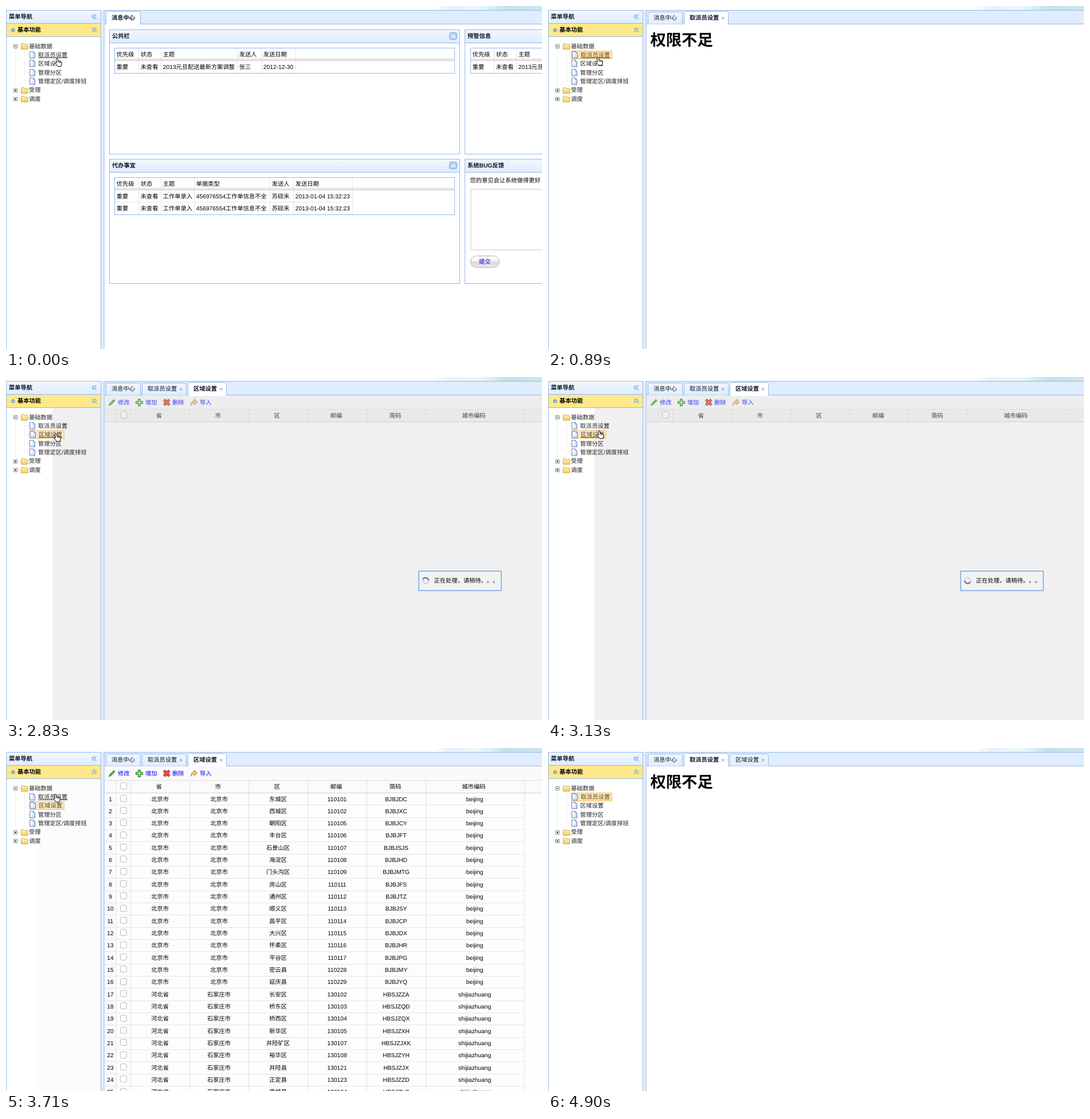
Recreate the animation shown at these times as an HTML page. Size 935 by 599 pixels, loop 5.3 s.

```html
<!DOCTYPE html>
<html lang="zh-CN">
<head>
<meta charset="utf-8">
<style>
html, body { margin: 0; width: 100%; height: 100%; overflow: hidden; background: #fff; }
svg { display: block; font: 10.25px "Liberation Sans", "Noto Sans CJK SC", "Noto Sans CJK", sans-serif; text-rendering: geometricPrecision; text-spacing-trim: space-all; }
</style>
</head>
<body>
<svg width="935" height="599" viewBox="0 0 935 599">
  <defs>
    <linearGradient id="bar" x2="0" y2="1"><stop stop-color="#f1f6ff"/><stop offset="1" stop-color="#e0ecff"/></linearGradient>
    <linearGradient id="head" x2="0" y2="1"><stop offset=".7" stop-color="#fff"/><stop offset="1" stop-color="#d6d6d6"/></linearGradient>
    <linearGradient id="pill" x2="0" y2="1"><stop stop-color="#fff"/><stop offset=".48" stop-color="#f1f1f1"/><stop offset=".52" stop-color="#d8d8d8"/><stop offset="1" stop-color="#ececec"/></linearGradient>
    <linearGradient id="folder" x2="0" y2="1"><stop stop-color="#fff3bd"/><stop offset="1" stop-color="#f5cf55"/></linearGradient>
    <linearGradient id="page" x2="1" y2="1"><stop offset=".3" stop-color="#fff"/><stop offset="1" stop-color="#b5cff2"/></linearGradient>
    <linearGradient id="banner"><stop stop-color="#fff"/><stop offset=".15" stop-color="#e8f1fb"/><stop offset=".4" stop-color="#eef7fb"/><stop offset=".55" stop-color="#d5eff3"/><stop offset=".68" stop-color="#c5dfe8"/><stop offset="1" stop-color="#cde7ee"/></linearGradient>
  </defs>
  <g id="scene"></g>
</svg>
<script>
const LOOP = 5300, BLUE = '#95b8e7', INK = '#0b1526';

// start, view, selected tree row, underlined tree row, cursor, x, y
const steps = [
  [0, 'desk', 0, 1, 'hand', 85, 91],
  [150, 'desk', 0, 1, 'hand', 83, 89],
  [890, 'denied', 1, 1, 'hand', 83, 89],
  [1490, 'denied', 1, 1, 'hand', 84, 93],
  [1640, 'denied', 1, 2, 'hand', 82, 101],
  [1930, 'blank', 2, 2, 'hand', 82, 101],
  [2830, 'loading', 2, 2, 'hand', 83, 98],
  [2980, 'loading', 2, 2, 'hand', 84, 95],
  [3130, 'loading', 2, 2, 'hand', 85, 93],
  [3280, 'grid', 2, 1, 'hand', 85, 87],
  [3420, 'grid', 2, 1, 'hand', 88, 78],
  [3570, 'grid', 2, 0, 'arrow', 86, 77],
  [3710, 'grid', 2, 1, 'hand', 82, 80],
  [4010, 'blank', 1, 1, 'hand', 82, 80],
  [4160, 'denied', 1, 1, 'hand', 82, 80],
  [4310, 'denied', 1, 0, 'arrow', 126, 104],
  [4450, 'denied', 1, 0, 'arrow', 340, 234],
  [4600, 'denied', 1, 0, 'arrow', 825, 520],
  [4750, 'denied', 1, 0, 'arrow', 933, 596],
  [4900, 'denied', 1, 0, 'none', 0, 0],
];

const rect = (x, y, w, h, fill, more = '') => `<rect x="${x}" y="${y}" width="${w}" height="${h}" fill="${fill}" ${more}/>`;
const box = (x, y, w, h, fill, stroke, r = 0) => rect(x + .5, y + .5, w - 1, h - 1, fill, `stroke="${stroke}" rx="${r}"`);
const path = (d, fill, stroke = 'none', width = 1) => `<path d="${d}" fill="${fill}" stroke="${stroke}" stroke-width="${width}"/>`;
const dots = (d, color = '#ccc') => `<path d="${d}" fill="none" stroke="${color}" stroke-dasharray="1 1"/>`;
const at = (x, y, body) => `<g transform="translate(${x} ${y})">${body}</g>`;
// y is the middle of the line
const text = (s, x, y, fill = '#000', more = '') => `<text x="${x}" y="${y + 3.8}" fill="${fill}" ${more}>${s}</text>`;
const bold = (s, x, y, fill = INK) => text(s, x, y, fill, 'font-weight="bold"');
const centred = (s, x, y, fill) => text(s, x, y, fill, 'text-anchor="middle"');

function frame() {
  return rect(745, 0, 190, 7, 'url(#banner)') +
    rect(0, 7, 166, 592, BLUE) + rect(1, 8, 164, 22, 'url(#bar)') +
    rect(1, 31, 164, 22, '#fde98a') + rect(1, 54, 164, 545, '#fff') +
    rect(166, 7, 5, 592, '#e4eefd') +
    rect(170.6, 7, 765, 592, BLUE) + rect(171.6, 8, 764, 23, '#e0ecff') + rect(171.6, 32, 764, 567, '#fff') +
    bold('菜单导航', 5, 18.5) + bold('基本功能', 20, 41.5, '#000') +
    path('M153.500 14.500l-3.500 4 3.500 4M157.500 14.500l-3.500 4 3.500 4M150 41.500l4-3.500 4 3.500M150 45.500l4-3.500 4 3.500', 'none', '#6f9fe0', 1.2) +
    '<circle cx="12.300" cy="42.300" r="2.200" fill="#fff" stroke="#4f83cf" stroke-width="1.600"/>';
}

function tree(selected, underlined) {
  const rowY = i => 69.7 + 15.38 * i;
  const folder = i => at(26, Math.round(rowY(i)) - 5, path('M.5 10.500V1.500Q.5.5 1.500.5h3l1.500 1.500h5q1 0 1 1v7.500z', 'url(#folder)', '#d3a843'));
  const toggle = (i, sign) => at(13, Math.round(rowY(i)) - 4, box(0, 1, 7, 7, '#fff', '#888') + path(sign, 'none', '#000'));
  const minus = 'M2 4.500h3', plus = minus + 'M3.500 3v3';
  let out = dots('M16.500 75V142M32.500 77V131M33 85.500h7M33 100.500h7M33 116.500h7M33 131.500h7M20 70.500h6M20 147.500h6M20 162.500h6', '#ddd');
  ['基础数据', '取派员设置', '区域设置', '管理分区', '管理定区/调度排班', '受理', '调度'].forEach((label, i) => {
    const y = rowY(i), leaf = i > 0 && i < 5, on = i && i === selected;
    if (!leaf) {
      out += toggle(i, i ? plus : minus) + folder(i) + text(label, 40, y, '#222');
      return;
    }
    const dx = on ? 1 : 0;
    if (on) {
      const [fill, edge] = i === 1 ? ['#ffe6b0', '#f2bb5c'] : ['#f9e6c0', '#e8c48a'];
      out += box(40, Math.round(y) - 7, Math.round(label.length * 10.25 + 21), 15, fill, edge);
    }
    out += at(41 + dx, Math.round(y) - 6, path('M.5.5h6l3 3v8.500h-9z', 'url(#page)', '#6580b5') + path('M6.500.5v3h3', 'none', '#6580b5', .8));
    out += text(label, 56 + dx, y, on ? '#5a4a2a' : '#222');
    if (i === underlined) out += rect(56 + dx, Math.round(y) + 5, label.length * 10.25, 1, '#444');
  });
  return out;
}

function tabs(count, active) {
  return [['消息中心', 175, 60], ['取派员设置', 238, 77], ['区域设置', 318, 67]].slice(0, count).map(([label, x, w], i) => {
    const on = i === active, top = on ? 9.5 : 10.5, cross = x + w - 10;
    return path(`M${x - .5} 31.500V${top + 3}q0-3 3-3h${w - 6}q3 0 3 3V31.500`, on ? '#fff' : 'url(#bar)', BLUE) +
      (on ? rect(x, 31, w - 1, 2, '#fff') : '') +
      (on ? bold : text)(label, x + 9, 20.3, INK) +
      (i ? path(`M${cross - 2} 19l4.500 4.500m0-4.500l-4.500 4.500`, 'none', '#6d87ad') : '');
  }).join('');
}

function panel(title, x, y) {
  const w = 612;
  return box(x, y, w, 218, '#fff', BLUE) + rect(x + 1, y + 1, w - 2, 22, 'url(#bar)') + rect(x, y + 23, w, 1, BLUE) +
    bold(title, x + 5, y + 11.5) +
    at(x + 593, y + 5, box(0, 0, 14, 13, '#b9d3f3', '#7ea6da', 3) + path('M3.500 8.500L7 5 10.500 8.500z', '#fff'));
}

// columns holds the right edge of every column
function table(x, y, columns, rows) {
  const w = 594, h = Math.round(rows.length * 21.5 + 1.5);
  let out = box(x, y, w, h, '#fff', BLUE) + rect(x + 1, y + 1, w - 2, 22, 'url(#head)');
  rows.forEach((cells, r) => {
    const bottom = Math.round(y + 21.5 * (r + 1)) + .5;
    if (r && r < rows.length - 1) out += dots(`M${x + 1} ${bottom}H${columns.at(-1)}`);
    cells.split('|').forEach((s, c) => out += text(s, (c ? columns[c - 1] : x) + 3.8, y + 11.3 + 21.4 * r));
  });
  return out + columns.map(c => dots(`M${c + .5} ${y + 1}V${y + h - 1}`)).join('');
}

function desk() {
  const notice = ['优先级|状态|主题|发送人|发送日期', '重要|未查看|2013元旦配送最新方案调整|张三|2012-12-30'];
  const job = '重要|未查看|工作单录入|456976554工作单信息不全|苏砚禾|2013-01-04 15:32:23';
  return panel('公共栏', 180, 41) + table(189, 73, [231, 270, 403, 445, 505], notice) +
    panel('代办事宜', 180, 267) + table(189, 299, [231, 270, 328, 460, 501, 604], ['优先级|状态|主题|单据类型|发送人|发送日期', job, job]) +
    panel('预警信息', 800, 41) + table(810, 73, [851, 890, 1023, 1065, 1125], notice) +
    panel('系统BUG反馈', 800, 267) + text('您的意见会让系统做得更好', 809.5, 304) +
    rect(811, 320, 200, 106, '#fff', 'stroke="#e3e3e3" stroke-width="2"') +
    box(810, 436, 51, 21, 'url(#pill)', '#adadad', 10) + centred('提交', 835.3, 446.3, '#00d');
}

const districts = ('东城区 110101 DC,西城区 110102 XC,朝阳区 110105 CY,丰台区 110106 FT,石景山区 110107 SJS,海淀区 110108 HD,' +
  '门头沟区 110109 MTG,房山区 110111 FS,通州区 110112 TZ,顺义区 110113 SY,昌平区 110114 CP,大兴区 110115 DX,怀柔区 110116 HR,' +
  '平谷区 110117 PG,密云县 110228 MY,延庆县 110229 YQ,长安区 130102 ZA,桥东区 130103 QD,桥西区 130104 QX,新华区 130105 XH,' +
  '井陉矿区 130107 JXK,裕华区 130108 YH,井陉县 130121 JX,正定县 130123 ZD,栾城县 130124 LC').split(',').map(s => s.split(' '));

function toolbar() {
  const cross = 'M275.500 39.500l9.500 9.500m0-9.500l-9.500 9.500';
  return [['修改', 195], ['增加', 243], ['删除', 290], ['导入', 338]].map(([s, x]) => text(s, x, 44.3, '#00f')).join('') +
    path('M179.500 50l1.200-3.800 7.300-7.200 2.400 2.400-7.300 7.200z', '#58b04a', '#2f7a2a', .8) +
    path('M230.500 38.500h4v4h4v4h-4v4h-4v-4h-4v-4h4z', '#6cc35c', '#2c7f2c') + path('M232.500 41v7M229 44.500h7', 'none', '#d5f0cd') +
    path(cross, 'none', '#a81c1c', 4.6) + path(cross, 'none', '#e85a50', 2.4) +
    path('M322.500 49.500q0-8 6-8v-3l5.500 5-5.500 5v-3q-4 0-6 4z', '#f3c673', '#a87a3a', .8);
}

function grid(filled) {
  const edges = [192, 217, 320, 423, 526, 629, 732, 904], centres = [267, 370, 473, 576, 679, 816];
  const check = y => box(199, Math.round(y) - 6, 12, 12, '#fff', '#b9b9b9', 2.5);
  let out = rect(172, 32, 763, 567, filled ? '#fdfdfd' : '#fff') + rect(172, 33, 763, 23, '#fafafa') + rect(172, 56, 763, 1, '#ddd') + toolbar() +
    rect(172, 57, 763, 21, filled ? '#fafafa' : '#f4f4f4') + rect(172, 78, 763, 1, '#d4d4d4') + check(66);
  ['省', '市', '区', '邮编', '简码', '城市编码'].forEach((s, i) => out += centred(s, centres[i], 67.3));
  if (filled) {
    out += rect(172, 79, 20, 520, '#fafafa');
    districts.forEach(([name, zip, code], i) => {
      const y = 88.7 + 21.33 * i, line = Math.round(y + 10.7) + .5;
      const cells = i < 16 ? ['北京市', '北京市', name, zip, 'BJBJ' + code, 'beijing'] : ['河北省', '石家庄市', name, zip, 'HBSJZ' + code, 'shijiazhuang'];
      out += centred(i + 1, 182, y) + check(y - 1) + dots(`M172 ${line}H904`);
      cells.forEach((s, c) => out += centred(s, centres[c] + 1.6, y));
    });
  }
  return out + edges.map(x => dots(`M${x + .5} 57V${filled ? 599 : 78}`)).join('');
}

function loading(turn) {
  return grid(false) + rect(172, 32, 763, 567, '#ccc', 'opacity=".3"') +
    rect(720, 339, 144, 34, '#f2f2f2', `stroke="${BLUE}" stroke-width="2"`) +
    text('正在处理，请稍待。。。', 746.5, 355.3) +
    at(732, 355.5, `<g transform="rotate(${turn})">` + '<circle r="5" fill="none" stroke="#cbd0d8" stroke-width="2"/>' +
      path('M-4.500-2.200A5 5 0 0 1 5 0', 'none', '#4a6c9f', 2) + '</g>');
}

const views = {
  desk,
  blank: () => '',
  denied: () => '<text x="178.500" y="68.500" font-size="27.300" font-weight="bold">权限不足</text>',
  loading: start => loading((start - 2830) / 150 * 90),
  grid: () => grid(true),
};

const cursors = {
  hand: path('M3.400 8.600L2.600 2.400Q2.600.7 3.900.7T5.500 2.200L6.100 5.600Q7.500 4.900 8.200 6 9.500 5.500 10.100 6.700 12 6.300 12.300 8.200 12.600 10.500 11 14.400H5.300Q3.800 12.200 1.200 9.600.3 8.300 1.400 7.700 2.400 7.500 3.400 8.600z', '#fff', '#000') +
    path('M6.100 5.600l.4 2.800M8.200 6l.3 2.400M10.100 6.700l.1 2', 'none', '#000', .7),
  arrow: path('M.5.8V13.300L3.500 10.600 5.500 15.300 7.800 14.300 5.800 9.800H10z', '#000', '#fff', .8),
  none: '',
};

function draw([start, view, selected, underlined, cursor, x, y]) {
  const tabCount = start < 890 ? 1 : start < 1930 ? 2 : 3;
  const shade = view === 'loading' ? rect(81, 54, 84, 545, '#f0f0f0') : view === 'grid' ? rect(55, 54, 110, 545, '#fcfcfc') : '';
  document.getElementById('scene').innerHTML = frame() + shade + tree(selected, underlined) +
    views[view](start) + tabs(tabCount, selected) + at(x, y, cursors[cursor]);
}

let shown;
function tick() {
  const t = performance.now() % LOOP;
  const step = steps.findLast(s => s[0] <= t);
  if (step !== shown) draw(shown = step);
  requestAnimationFrame(tick);
}
tick();
</script>
</body>
</html>
```
